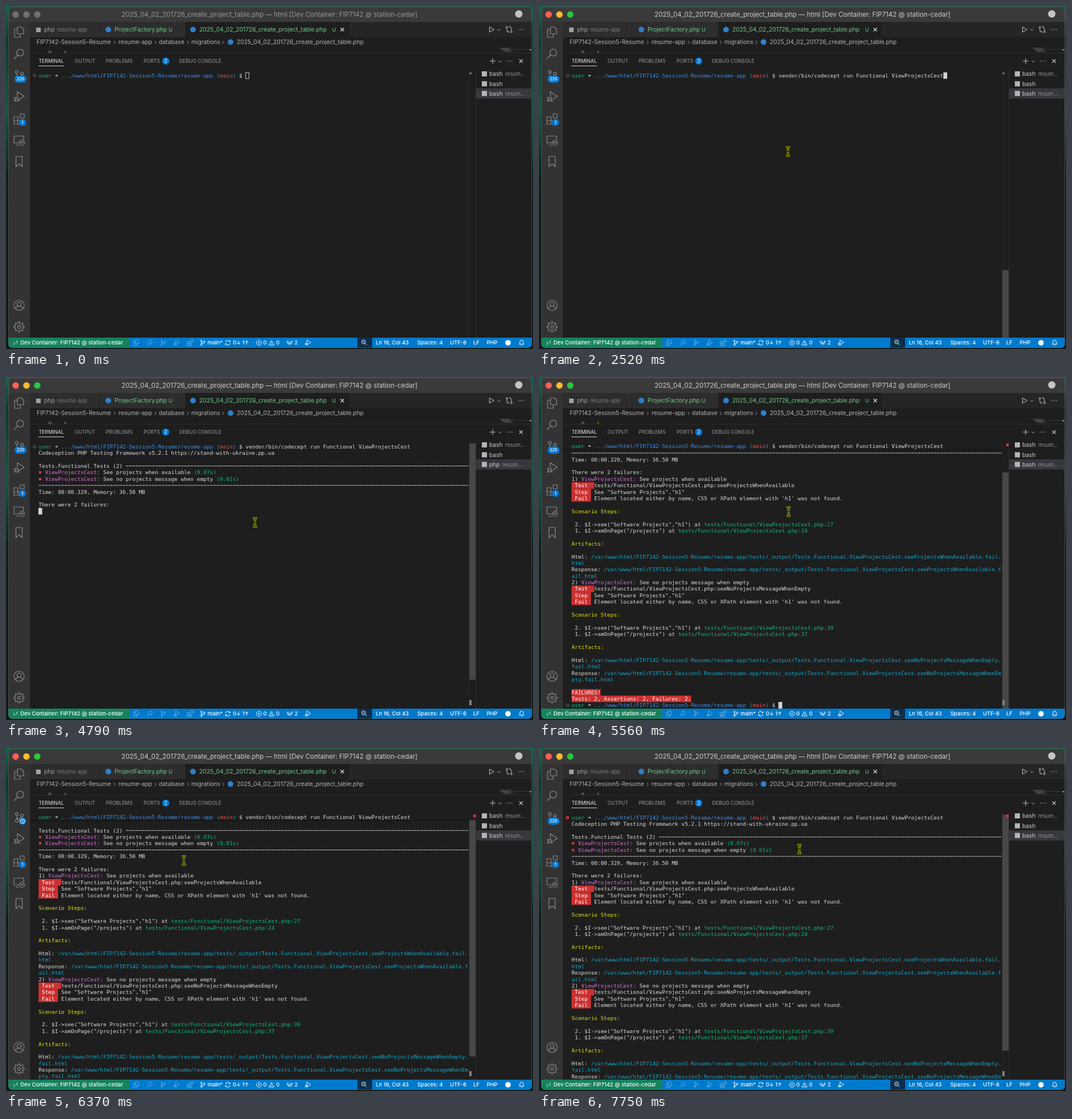
These frames come from a looping animation (927x604 px, 8000 ms). An HTML page:

```html
<!DOCTYPE html>
<html lang="en">
<head>
<meta charset="utf-8">
<title>Terminal test run</title>
<style>
html, body { margin: 0; width: 100%; height: 100%; overflow: hidden; background: #0b1d18; }
svg { display: block; width: 927px; height: 604px; }
text { white-space: pre; font-family: Inter, "Open Sans", sans-serif; }
.mono { font-family: "DejaVu Sans Mono", monospace; font-size: 9.45px; }
</style>
</head>
<body>
<svg id="stage" viewBox="0 0 927 604" xmlns="http://www.w3.org/2000/svg">
  <defs>
    <linearGradient id="desk" x2="0" y2="1">
      <stop offset="0" stop-color="#12694a"/><stop offset=".1" stop-color="#0c3a2c"/>
      <stop offset=".3" stop-color="#125a42"/><stop offset=".5" stop-color="#0a2019"/>
      <stop offset="1" stop-color="#101a18"/>
    </linearGradient>
    <clipPath id="win"><rect x="4" y="1" width="921" height="601" rx="7"/></clipPath>
    <clipPath id="term"><rect x="42" y="113" width="784" height="471"/></clipPath>
  </defs>
</svg>
<script>
const LOOP = 8000, CELL = 5.69, ROW = 11.39, LEFT = 57.3, TOP = 122.5;
const svg = document.getElementById('stage');

function el(tag, attrs, parent = win) {
  const n = document.createElementNS(svg.namespaceURI, tag);
  for (const k in attrs) n.setAttribute(k, attrs[k]);
  parent.appendChild(n);
  return n;
}
const rect = (x, y, width, height, fill, parent, more) =>
  el('rect', { x, y, width, height, fill, ...more }, parent);
const dot = (cx, cy, r, fill, parent, more) => el('circle', { cx, cy, r, fill, ...more }, parent);
function label(x, mid, str, size, fill, more, parent) {
  const n = el('text', { x, y: mid + size * .36, 'font-size': size, fill, ...more }, parent);
  n.textContent = str;
  return n;
}
const icon = (x, y, d, color, scale = 1, width = 1.2, parent) => el('path', {
  d, fill: 'none', stroke: color, 'stroke-width': width / scale,
  'stroke-linejoin': 'round', transform: `translate(${x} ${y}) scale(${scale})`
}, parent);
const ring = (x, y, r) => `M${x - r} ${y}a${r} ${r} 0 1 0 ${2 * r} 0a${r} ${r} 0 1 0 ${-2 * r} 0`;
const show = (n, on) => n.setAttribute('display', on ? 'inline' : 'none');

// Shared glyph paths, centred on 0,0
const G = {
  files: 'M-3 -9h7l4 4v8h-11zM-3 -5h-5v14h10v-6',
  search: ring(2, -2, 6) + 'M-2.5 2.5L-9 9',
  branch: ring(-4, -6, 2.5) + ring(-4, 6, 2.5) + ring(5, -3, 2.5) + 'M-4 -3.5v7M5 -.5c0 3-6 2-9 3',
  debug: 'M-3 -1V-9L9 -1L1 4.5' + ring(-4, 4, 3.4) + 'M-9 1l2 1M-9 8l2-2M1 8l-2-2M-7.5 4h7',
  blocks: 'M-9 -4h7v7h7v6h-14zM-9 3h7v6M2 -9h7v7h-7z',
  remote: 'M8 -1V-8H-9V4h9M-6 8h6' + ring(5, 4, 4.5) + 'M3 5l1.5-1.5L3 2M7 2L5.5 3.5L7 5',
  mark: 'M-5.5 -9h11v18l-5.5-5l-5.5 5z',
  person: ring(0, 0, 9) + ring(0, -2, 3.6) + 'M-6 6.6c1-6.5 11-6.5 12 0',
  down: 'M-2.5 -1.2L0 1.3L2.5 -1.2',
  right: 'M-1.3 -2.8L1.5 0L-1.3 2.8',
  close: 'M-3 -3L3 3M3 -3L-3 3',
  more: 'M-4.5 0h1.2M-.6 0h1.2M3.3 0h1.2',
  compare: ring(-4, -4, 1.5) + ring(4, 4, 1.5) + 'M-4 -2.5v4q0 3 3 3h1l-1.8-1.8M4 2.5v-4q0-3-3-3h-1l1.8-1.8',
  sync: 'M-4 -1a4 4 0 0 1 7.5-1M4 1a4 4 0 0 1-7.5 1M4 -4v2.4h-2.4M-4 4v-2.4h2.4',
  fault: ring(0, 0, 4.3) + 'M-1.6 -1.6l3.2 3.2M1.6 -1.6l-3.2 3.2',
  warn: 'M0 -4L4.5 4h-9zM0 -1v2.5M0 2.4v.8',
  tower: 'M-2.5 4.5L0 -1L2.5 4.5M-1.5 2.5h3M-2.5 -4q-2 2.5 0 5M2.5 -4q2 2.5 0 5M-4.3 -5q-3 3.5 0 7M4.3 -5q3 3.5 0 7',
  bell: 'M-4 2.5h8l-1-1.5v-2.5a3 3 0 0 0-6 0v2.5zM-1 4.5h2',
  link: 'M-3.5 -1l2.5 2.3L-3.5 3.6M3.5 -3.6L1 -1.3L3.5 1'
};
const gear = Array.from({ length: 32 }, (_, i) => {
  const a = (i - .5) * Math.PI / 16, r = i % 4 < 2 ? 9 : 6.6;
  return (i ? 'L' : 'M') + (r * Math.cos(a)).toFixed(1) + ' ' + (r * Math.sin(a)).toFixed(1);
}).join('') + 'z' + ring(0, 0, 2.6);

// Names
const COURSE = 'FIP7142', HOST = 'station-cedar', USER = 'user';
const FILE = '2025_04_02_201726_create_project_table.php';
const DIR = COURSE + '-Session5-Resume';

// Window chrome
rect(0, 0, 927, 604, 'url(#desk)', svg);
const win = el('g', { 'clip-path': 'url(#win)' }, svg);
rect(4, 1, 921, 601, '#1e1e1e');
rect(4, 1, 921, 27, '#3a3a3a');
const lights = ['#ff5f57', '#febc2e', '#28c840'].map((c, i) => [dot(17 + 19 * i, 15, 5.7, c), c]);
const title = label(463.5, 15, `${FILE} — html [Dev Container: ${COURSE} @ ${HOST}]`, 11.5, '#ccc', { 'text-anchor': 'middle' });
dot(902, 14, 6.5, '#c5c5c5');

// Editor tabs and breadcrumbs
rect(42, 28, 883, 27, '#252526');
rect(42, 28, 121, 27, '#2d2d2d');
rect(164, 28, 151, 27, '#2d2d2d');
rect(316, 28, 287, 27, '#1e1e1e');
rect(53, 38, 8, 8, '#a0a0a0');
label(67, 41.5, 'php', 10.3, '#a0a0a0');
label(90, 42, 'resume-app', 9.2, '#7c7c7c');
const GREEN = '#73c991', PHP = '#2f7fc9';
dot(180, 41.5, 5, PHP);
label(191, 41.5, 'ProjectFactory.php', 10.3, GREEN);
label(286, 41.5, 'U', 9.4, GREEN);
dot(329, 41.5, 5, PHP);
label(340, 41.5, FILE, 10.3, GREEN);
label(573.5, 41.5, 'U', 9.4, GREEN);
icon(591.5, 41.5, G.close, '#e0e0e0');
const LIGHT = '#c5c5c5';
icon(854, 41.5, 'M-3.5 -4.5L4.5 0L-3.5 4.5z', LIGHT, 1, 1);
icon(867, 42, G.down, LIGHT, 1, .9);
icon(885, 41.5, G.compare, LIGHT, 1, 1);
icon(906, 41.5, G.more, LIGHT, 1, 1.4);
[[54, DIR], [198, 'resume-app'], [269, 'database'], [326, 'migrations'], [406, FILE]]
  .forEach(([x, s]) => label(x, 63.5, s, 10.25, '#b4b4b4'));
[191, 263, 320, 382].forEach(x => icon(x, 64, G.right, '#9a9a9a', 1, 1));
dot(395, 63.5, 5, PHP);

// Sliver of the editor above the panel
const sliver = el('g', { 'clip-path': 'inset(0 0 0 0)' });
dot(77, 81.5, 2, 'none', sliver, { stroke: '#a0a0a0' });
label(101, 82, '{', 10, '#e8c81e', { class: 'mono' }, sliver);
for (let i = 0; i < 5; i++) rect(868 + i * 2, 73.5 + i * 1.5, 22 - (i * 7) % 11, .8, '#5c6660', sliver);
rect(888, 76, 34, .8, '#3c3c3c', sliver);
rect(921, 76, 3, 2, '#9a9a9a', sliver);
rect(42, 83, 883, 501, '#1e1e1e');
rect(42, 82.5, 883, .8, '#353535');

// Panel header
label(57.5, 97, 'TERMINAL', 8.7, '#e7e7e7');
rect(57, 105, 45, 1, '#d0d0d0');
[[120.5, 'OUTPUT'], [175.5, 'PROBLEMS'], [242, 'PORTS'], [304.5, 'DEBUG CONSOLE']]
  .forEach(([x, s]) => label(x, 97, s, 8.7, '#9a9a9a'));
dot(281, 97, 6.3, '#0078d4');
label(281, 97, '2', 8.4, '#fff', { 'text-anchor': 'middle' });
icon(856, 97, 'M-5 0h10M0 -5v10', LIGHT, 1, 1);
icon(869, 97.5, G.down, LIGHT, 1, .9);
icon(886, 97, G.more, LIGHT, 1, 1.4);
icon(906, 97, G.close, LIGHT);

// Terminal list
rect(826, 113, .8, 471, '#303030');
rect(827, 145, 97, 18, '#37373d');
const sessions = [[119.5, 1], [137, 0], [154, 1]].map(([y, sub]) => {
  rect(837, y - 4.5, 9, 9, '#b5b5b5');
  return [label(850, y, 'bash', 10.2, '#cfcfcf'), sub && label(878, y + .3, 'resum...', 9.2, '#929292')];
});

// Activity bar
rect(4, 28, 38, 556, '#333');
[[46, G.files], [84, G.search], [122, G.branch], [160, G.debug], [199, G.blocks], [237, G.remote],
  [274, G.mark], [527, G.person], [565, gear]].forEach(([y, d]) => icon(23, y, d, '#8a8a8a'));
const count = el('g', {});
rect(15, 122.5, 21, 12.5, '#0078d4', count, { rx: 6.2 });
label(25.5, 128.8, '220', 7.2, '#fff', { 'text-anchor': 'middle', 'font-weight': 600 }, count);
const clock = el('g', {});
dot(29, 129, 6.3, '#0078d4', clock);
icon(29, 129, ring(0, 0, 3.9) + 'M0 -2.3V.3L1.8 1.3', '#fff', 1, 1, clock);
dot(29, 205, 6.2, '#0078d4');
label(29, 205, '1', 7.2, '#fff', { 'text-anchor': 'middle', 'font-weight': 600 });

// Terminal text: {colour:text} marks a coloured run
const INK = { g: '#0dbc79', b: '#3b8eea', c: '#11a8cd', r: '#f14c4c', m: '#d670d6', y: '#e5e510', R: '#fff' };
const prompt = `{g:${USER}} {w:➜} {b:.../www/html/${DIR}/resume-app} {c:(}{r:main}{c:)} $ `;
const COMMAND = 'vendor/bin/codecept run Functional ViewProjectsCest';
const OUT = `/var/www/html/${DIR}/resume-app/tests/_output/Tests.Functional.ViewProjectsCest.`;

function wrapped(head, path) {
  const room = 133 - head.length;
  return [`${head}{c:${path.slice(0, room)}}`, `{c:${path.slice(room)}}`];
}
function failure(n, what, method, line, start) {
  const path = `${OUT}${method}.fail.html`, spot = 'at {g:tests/Functional/ViewProjectsCest.php:';
  return [
    `${n}) {m:ViewProjectsCest:} ${what}`,
    `{R: Test  }tests/Functional/ViewProjectsCest.php:${method}`,
    '{R: Step } See "Software Projects","h1"',
    "{R: Fail } Element located either by name, CSS or XPath element with 'h1' was not found.",
    '', '{y:Scenario Steps:}', '',
    ` 2. $I->see("Software Projects","h1") ${spot}${line}}`,
    ` 1. $I->amOnPage("/projects") ${spot}${start}}`,
    '', '{y:Artifacts:}', '',
    ...wrapped('Html: ', path), ...wrapped('Response: ', path)
  ];
}
const lines = [
  prompt,
  'Codeception PHP Testing Framework v5.2.1 https://stand-with-ukraine.pp.ua', '',
  'Tests.Functional Tests (2) {d:-}',
  '{r:✖} {m:ViewProjectsCest:} See projects when available {g:(0.07s)}',
  '{r:✖} {m:ViewProjectsCest:} See no projects message when empty {g:(0.01s)}',
  '{d:-}', 'Time: 00:00.329, Memory: 36.50 MB', '', 'There were 2 failures:',
  ...failure(1, 'See projects when available', 'seeProjectsWhenAvailable', 27, 24),
  ...failure(2, 'See no projects message when empty', 'seeNoProjectsMessageWhenEmpty', 39, 37),
  '', '{R:FAILURES!}', '{R:Tests: 2, Assertions: 2, Failures: 2.}', prompt
];
const CURSOR_COL = 64, LAST = lines.length - 1;

function drawLine(src, mid, parent) {
  const g = el('g', {}, parent);
  let col = 0;
  for (const [all, key, inner] of src.matchAll(/\{(\w):([^}]*)\}|[^{]+/g)) {
    const str = key ? inner : all, x = LEFT + col * CELL;
    if (key === 'd') {
      el('path', { d: `M${x} ${mid}H${LEFT + 133 * CELL}`, stroke: '#dcdcdc', 'stroke-width': .9, 'stroke-dasharray': `${CELL - .8} .8` }, g);
    } else {
      if (key === 'R') rect(x, mid - ROW / 2, str.length * CELL, ROW + .1, '#cd3131', g);
      el('text', { x, y: mid + 3.4, class: 'mono', fill: INK[key] || '#dcdcdc' }, g).textContent = str;
    }
    col += str.length;
  }
  return g;
}
const command = (mid, parent) =>
  el('text', { x: LEFT + CURSOR_COL * CELL, y: mid + 3.4, class: 'mono', fill: '#dcdcdc' }, parent);

const term = el('g', { 'clip-path': 'url(#term)' });
const page = el('g', {}, term);
const rows = lines.map((s, i) => drawLine(s, TOP + i * ROW, page));
const typed = command(TOP, page);
const idle = dot(50, TOP, 2.4, 'none', page, { stroke: '#6c6c6c' });
const failed = dot(50, TOP, 3, '#c63b40', page);
const cross = icon(50, TOP, 'M-1.2 -1.2l2.4 2.4M1.2 -1.2l-2.4 2.4', '#1e1e1e', 1, .8, page);
dot(50, TOP + LAST * ROW, 2.4, 'none', rows[LAST], { stroke: '#6c6c6c' });
const caret = rect(0, 0, CELL, 10.6, '#d4d4d4', page, { stroke: '#d4d4d4', 'stroke-width': .9 });

const sticky = el('g', {}, term);
rect(42, 113, 772, 14.5, '#1e1e1e', sticky);
rect(42, 127.3, 772, 1, '#121212', sticky);
drawLine(prompt, 121.4, sticky);
command(121.4, sticky).textContent = COMMAND;

rect(814.6, 113, .7, 471, '#2a2a2a', term);
const thumb = rect(815, 0, 11, 0, '#474747', term);
const markTop = rect(815, 117, 4, 3, '#707070', term);
const markLow = rect(815, 569, 4, 9, '#808080', term);
const markRed = rect(822, 117, 4, 5, '#e0353a', term);

// Status bar
rect(4, 584, 213, 18, '#16825d');
rect(217, 584, 708, 18, '#007acc');
rect(618, 584, 26, 18, '#0b2f4c');
const status = (x, s) => label(x, 593, s, 9.45, '#fff', { 'font-weight': 500 });
icon(17, 593, G.link, '#fff', 1, 1);
status(25.5, `Dev Container: ${COURSE} @ ${HOST}`);
[G.files, G.search, G.branch, G.debug, G.blocks].forEach((d, i) => icon(229 + 23.7 * i, 593, d, '#6db4e6', .56, .9));
icon(346, 593, G.branch, '#fff', .56, 1);
icon(390, 593, G.sync, '#fff', 1, 1);
icon(445, 593, G.fault, '#fff', 1, .9);
icon(467, 593, G.warn, '#fff', 1, .9);
icon(499, 593, G.tower, '#fff', .8, .9);
icon(531, 593, G.debug, '#fff', .55, .9);
icon(630, 592.5, 'M4.5 4.5L1.8 1.8M-2.5 -1h3' + ring(-1, -1, 3.4), '#fff', 1, 1);
[[354.5, 'main*'], [399, '0↓ 1↑'], [452.5, '0'], [475, '0'], [507.5, '2'], [650.5, 'Ln 16, Col 43'],
  [723.5, 'Spaces: 4'], [781, 'UTF-8'], [822, 'LF'], [845.5, 'PHP']].forEach(([x, s]) => status(x, s));
dot(883, 593, 4.8, '#fff');
icon(907, 593, G.bell, '#fff', 1, 1);
rect(4.4, 1.4, 920.2, 600.2, 'none', svg, { rx: 7, stroke: '#777', 'stroke-opacity': .55, 'stroke-width': .8 });

// Mouse pointer
const mouse = el('g', {}, svg);
const beam = 'M-3.6 -7.6Q0 -7.6 0 -5V5Q0 7.6 -3.6 7.6M3.6 -7.6Q0 -7.6 0 -5V5Q0 7.6 3.6 7.6M-2 0H2';
icon(0, 0, beam, '#b9c800', 1, 3.4, mouse);
icon(0, 0, beam, '#1c2000', 1, 1.3, mouse);

const trail = [[330, 144, 594], [800, 444, 264], [960, 444, 264], [1090, 438, 256], [5500, 438, 256], [5560, 439, 237],
  [5960, 313, 194], [6150, 313, 194], [6250, 313, 198], [6840, 313, 198], [7630, 437, 177], [7750, 458, 178]];
function along(t) {
  const i = trail.findIndex(p => p[0] > t);
  if (i < 0) return trail[trail.length - 1].slice(1);
  if (i === 0) return trail[0].slice(1);
  const [t0, x0, y0] = trail[i - 1], [t1, x1, y1] = trail[i];
  const u = (t - t0) / (t1 - t0), e = u * u * (3 - 2 * u);
  return [x0 + (x1 - x0) * e, y0 + (y1 - y0) * e];
}
// Last entry whose start time has passed
const step = (t, list) => list.filter(e => e[0] <= t).pop()[1];

function draw(t) {
  const focused = t >= 970, done = t >= 4790;
  lights.forEach(([n, c]) => n.setAttribute('fill', focused ? c : '#717171'));
  title.setAttribute('fill', focused ? '#cfcfcf' : '#999');

  const text = step(t, [[0, ''], [1800, 'clear'], [2520, COMMAND]]);
  typed.textContent = text;
  const top = step(t, [[0, 0], [4870, 5], [5960, 4], [6130, 3], [6250, 2], [6370, 1], [6480, 0]]);
  const filled = step(t, [[0, 0], [4460, 1], [4530, 3], [4610, 4], [4790, 9], [4870, 44], [5020, LAST]]);
  rows.forEach((n, i) => show(n, i <= filled));
  page.setAttribute('transform', `translate(0 ${-top * ROW})`);
  show(sticky, top > 0);

  const line = t < 4380 ? 0 : Math.min(LAST, filled + 1);
  const col = t < 4380 ? CURSOR_COL + text.length : line === LAST && t >= 5020 ? CURSOR_COL : 0;
  caret.setAttribute('x', LEFT + col * CELL + .2);
  caret.setAttribute('y', TOP + line * ROW - 5.3);
  caret.setAttribute('fill', focused ? '#d4d4d4' : 'none');

  const over = t >= 5020;
  show(idle, !over);
  show(failed, over);
  show(cross, over);
  show(markTop, !done);
  show(markLow, done);
  show(markRed, over);
  show(thumb, focused);
  thumb.setAttribute('y', done ? 117 + top * 10.2 : 465);
  thumb.setAttribute('height', done ? 416 : 119);

  const busy = t >= 4460 && t < 4940, [name, sub] = sessions[2];
  name.textContent = busy ? 'php' : 'bash';
  sub.setAttribute('x', busy ? 873 : 878);

  const syncing = t >= 6310 && t < 6660;
  show(count, !syncing);
  show(clock, syncing);

  show(mouse, t >= 330);
  mouse.setAttribute('transform', `translate(${along(t).map(v => v.toFixed(1)).join(' ')})`);
}
function frame() {
  draw(performance.now() % LOOP);
  requestAnimationFrame(frame);
}
frame();
</script>
</body>
</html>
```
